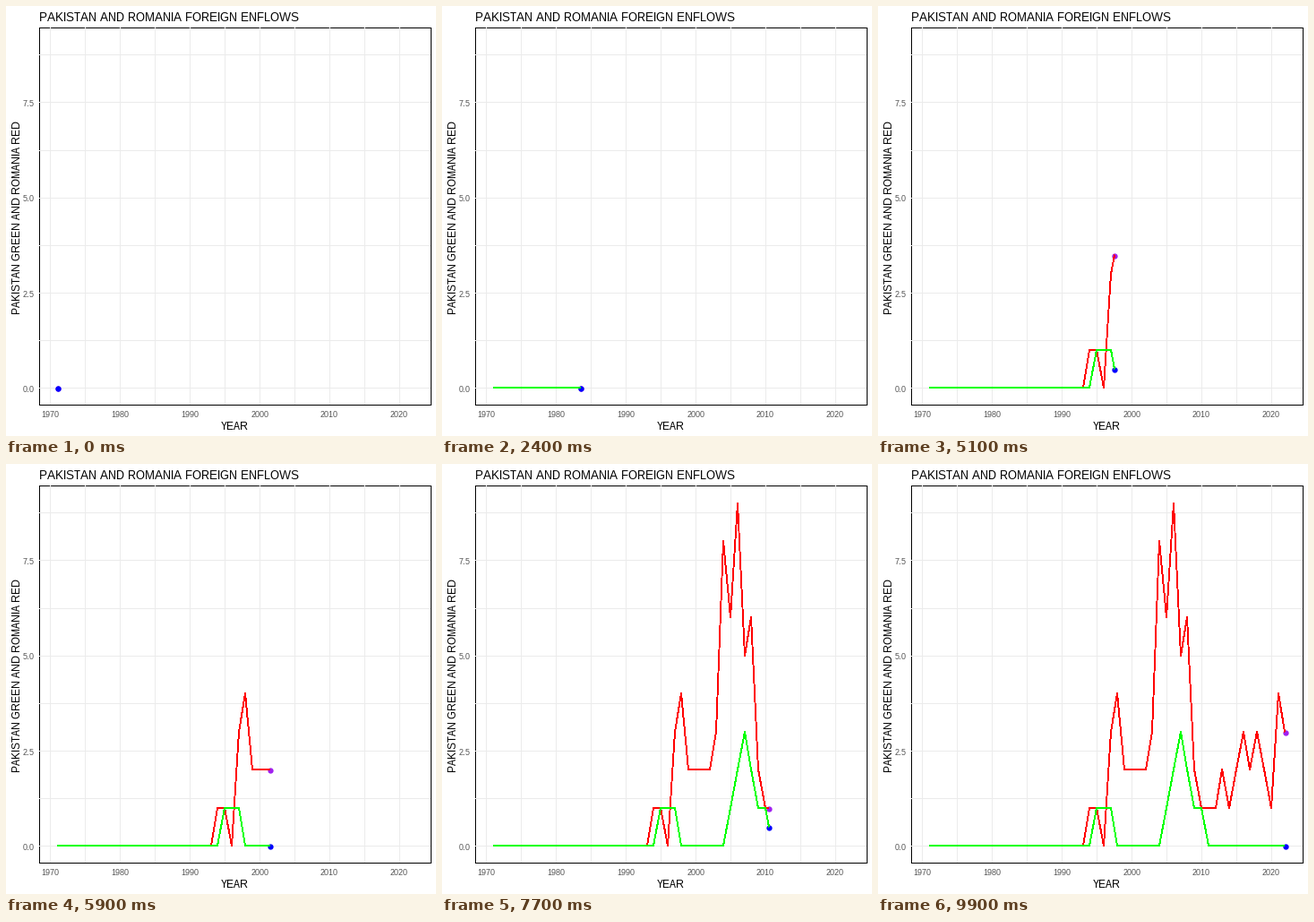
Animation of 480x480 px, one loop 10000 ms. Source, as a matplotlib script:

```python
import numpy as np
import matplotlib.pyplot as plt
from matplotlib.animation import FuncAnimation
from matplotlib.patches import Rectangle

SIZE, FRAMES, INTERVAL = 480, 100, 100
LEFT, RIGHT, TOP, BOTTOM = 37, 474, 24, 445
GRID, TICK = "#ebebeb", "#4d4d4d"
TITLE_SIZE, AXIS_SIZE, TICK_SIZE = 13.2, 11.7, 9

plt.rcParams.update({
    "font.family": "Liberation Sans",
    "text.hinting": "native",
    "text.hinting_factor": 1,
    "text.kerning_factor": 6,
})

years = np.arange(1971, 2023)
romania = np.zeros(years.size)
romania[23:] = [1, 1, 0, 3, 4, 2, 2, 2, 2, 3, 8, 6, 9, 5, 6, 2,
                1, 1, 1, 2, 1, 2, 3, 2, 3, 2, 1, 4, 3]
pakistan = np.zeros(years.size)
pakistan[24:27] = 1
pakistan[34:40] = [1, 2, 3, 2, 1, 1]


def px(year):
    return LEFT + 0.29 + (year - 1968.45) / 56.1 * (RIGHT - LEFT)


def py(value):
    return BOTTOM + 0.5 - (value + 0.45) / 9.9 * (BOTTOM - TOP)


fig = plt.figure(figsize=(SIZE / 72, SIZE / 72), dpi=72, facecolor="white")
ax = fig.add_axes([0, 0, 1, 1])
ax.set(xlim=(0, SIZE), ylim=(SIZE, 0))
ax.axis("off")


def box(x, y, w, h, color):
    ax.add_patch(Rectangle((x, y), w, h, fc=color, lw=0, antialiased=False))


def draw_panel():
    w, h = RIGHT - LEFT, BOTTOM - TOP
    box(LEFT, TOP, w + 1, h + 1, "black")
    box(LEFT + 1, TOP + 1, w - 1, h - 1, "white")
    # Grid lines cut through the left and top border only
    for year in range(1970, 2021, 5):
        box(round(px(year)), TOP, 1, h, GRID)
    for value in np.arange(0, 9, 1.25):
        box(LEFT, round(py(value)), w, 1, GRID)


def draw_labels():
    ax.text(37, 17, "PAKISTAN AND ROMANIA FOREIGN ENFLOWS", size=TITLE_SIZE)
    ax.text(255, 473, "YEAR", size=AXIS_SIZE, ha="center")
    ax.text(16, 236, "PAKISTAN GREEN AND ROMANIA RED", size=AXIS_SIZE,
            rotation=90, rotation_mode="anchor", ha="center", va="baseline")
    for year in range(1970, 2021, 10):
        ax.text(px(year), 459, str(year), size=TICK_SIZE, color=TICK, ha="center")
    for value in (0, 2.5, 5, 7.5):
        ax.text(32, py(value) + 4.5, f"{value:.1f}", size=TICK_SIZE,
                color=TICK, ha="right")


def make_line(color, z):
    return ax.plot([], [], color=color, lw=0.9, solid_capstyle="butt",
                   solid_joinstyle="round", antialiased=False, snap=False,
                   zorder=z)[0]


def make_dot(color, z):
    return ax.plot([], [], "o", color=color, ms=6.3, mew=0,
                   antialiased=False, zorder=z)[0]


draw_panel()
draw_labels()
series = [
    (romania, make_line("#ff0000", 4), make_dot("#a020f0", 3)),
    (pakistan, make_line("#00ff00", 6), make_dot("#0000ff", 5)),
]


def update(i):
    # The reveal advances in half-year steps
    now = 1971 + round(i * 102 / (FRAMES - 1)) / 2
    past = years < now
    artists = []
    for values, line, dot in series:
        head = np.interp(now, years, values)
        line.set_data(np.round(px(np.append(years[past], now))),
                      np.round(py(np.append(values[past], head))))
        dot.set_data([np.floor(px(now)) + 0.5], [np.round(py(head)) + 0.5])
        artists += [line, dot]
    return artists


anim = FuncAnimation(fig, update, frames=FRAMES, interval=INTERVAL,
                     repeat=True, repeat_delay=0, blit=False)
plt.show()
```
